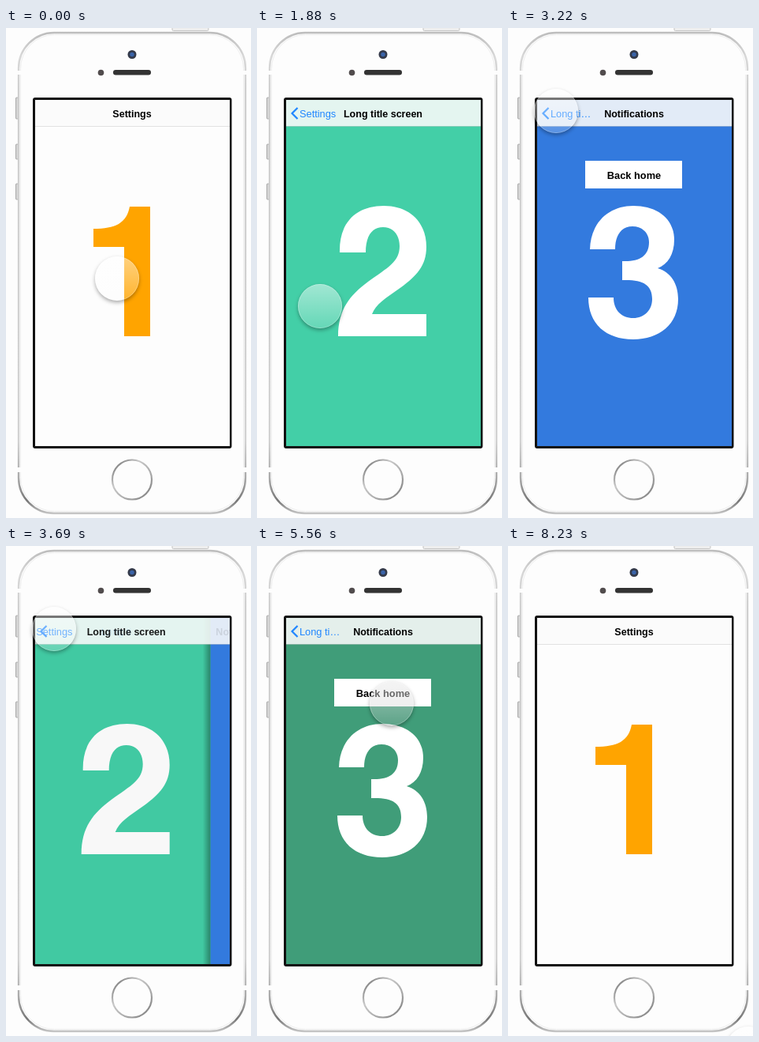
Animation, 311 px wide and 620 px high, one loop 8460 ms. Source, as an HTML page:

```html
<!DOCTYPE html>
<html lang="en">
<head>
<meta charset="utf-8">
<title>Navigation demo</title>
<style>
html, body { margin: 0; width: 100%; height: 100%; overflow: hidden; background: #fdfdfd; }
svg { display: block; width: 311px; height: 620px; }
text { font-family: "Liberation Sans", Arial, sans-serif; }
.title { font-weight: bold; font-size: 12.5px; text-anchor: middle; }
.label { font-size: 12.8px; fill: #1f86ff; }
.button { font-weight: bold; font-size: 12.8px; text-anchor: middle; }
</style>
</head>
<body>
<svg viewBox="0 0 311 620">
  <defs>
    <linearGradient id="metal" x1="0" y1="0" x2="0" y2="1">
      <stop offset="0" stop-color="#bdbdbd"/>
      <stop offset=".05" stop-color="#d8d8d8"/>
      <stop offset=".12" stop-color="#cfcfcf"/>
      <stop offset=".85" stop-color="#d2d2d2"/>
      <stop offset=".93" stop-color="#a8a8a8"/>
      <stop offset=".975" stop-color="#777"/>
      <stop offset="1" stop-color="#c4c4c4"/>
    </linearGradient>
    <linearGradient id="ring" x1="0" y1="0" x2="1" y2="1">
      <stop offset="0" stop-color="#666"/>
      <stop offset=".35" stop-color="#c8c8c8"/>
      <stop offset=".65" stop-color="#aaa"/>
      <stop offset="1" stop-color="#777"/>
    </linearGradient>
    <linearGradient id="glass" x1="0" y1="0" x2="0" y2="1">
      <stop offset="0" stop-color="#fff" stop-opacity=".5"/>
      <stop offset="1" stop-color="#fff" stop-opacity=".18"/>
    </linearGradient>
    <linearGradient id="edge">
      <stop offset="0" stop-opacity="0"/>
      <stop offset="1" stop-opacity=".35"/>
    </linearGradient>
    <filter id="blur" x="-50%" y="-50%" width="200%" height="200%">
      <feGaussianBlur stdDeviation="2.4"/>
    </filter>
    <clipPath id="screen"><rect x="37" y="91" width="247" height="438"/></clipPath>
    <clipPath id="outside">
      <path clip-rule="evenodd" d="M-50-50H50V50H-50ZM28 0A28 28 0 1 0-28 0A28 28 0 1 0 28 0Z"/>
    </clipPath>
  </defs>

  <rect width="311" height="620" fill="#fdfdfd"/>
  <rect x="211" y="-2" width="46" height="5.5" rx="1.5" fill="#eee" stroke="#c4c4c4"/>
  <g fill="#d6d6d6" stroke="#999" stroke-width=".8">
    <rect x="12.5" y="88" width="3" height="27" rx="1"/>
    <rect x="12.5" y="147" width="3" height="19" rx="1"/>
    <rect x="12.5" y="197" width="3" height="20" rx="1"/>
  </g>
  <rect x="16" y="6" width="288" height="608" rx="45" fill="#fdfdfd" stroke="url(#metal)" stroke-width="2.4"/>
  <rect x="18.5" y="8.5" width="283" height="603" rx="43" fill="none" stroke="#eee"/>
  <g fill="#fdfdfd">
    <rect x="13" y="54" width="6" height="5"/>
    <rect x="301" y="54" width="6" height="5"/>
    <rect x="13" y="556" width="6" height="6"/>
    <rect x="301" y="556" width="6" height="6"/>
  </g>
  <circle cx="160" cy="33.5" r="5.5" fill="#343a4a"/>
  <circle cx="160" cy="33.5" r="2.8" fill="#3a63a8"/>
  <circle cx="120.5" cy="56.5" r="3.8" fill="#514c4d"/>
  <rect x="136" y="53" width="48" height="6.5" rx="3.2" fill="#333"/>
  <circle cx="160" cy="571.5" r="25" fill="#fdfdfd" stroke="url(#ring)" stroke-width="2.2"/>

  <rect x="35.5" y="89.5" width="249.5" height="441" rx="1.5" fill="#fdfdfd" stroke="#111" stroke-width="3"/>
  <g clip-path="url(#screen)">
    <g id="pages"></g>
    <rect x="37" y="91" width="247" height="33.5" fill="#fbfbfb" fill-opacity=".88"/>
    <rect x="37" y="124" width="247" height="1" fill-opacity=".1"/>
    <g id="bars"></g>
    <path id="chevron" d="M51.5 101L44.5 108L51.5 115" fill="none" stroke="#1f86ff" stroke-width="2.2"/>
  </g>

  <g id="touch">
    <g clip-path="url(#outside)">
      <circle cy="2.5" r="28" fill-opacity=".32" filter="url(#blur)"/>
    </g>
    <circle id="press" r="28" fill-opacity=".09"/>
    <circle r="28" fill="url(#glass)"/>
    <circle r="27.6" fill="none" stroke="#fff" stroke-opacity=".35" stroke-width=".8"/>
  </g>
</svg>
<script>
const LOOP = 8460, WIDTH = 247, PARALLAX = 74, SWEEP = 160, SLIDE = 400;
const $ = id => document.getElementById(id);

const one = 'M183 226V390H150V277H111V254C139 254 153 247 157 226Z';
const two = 'M105 284C104 246 126 225 161 225C194 225 215 246 215 277C215 301 202 314 183 328' +
  'C163 342 151 349 146 362H215V390H103C103 356 118 338 141 321C166 303 181 296 181 276' +
  'C181 262 173 252 160 252C146 252 138 263 138 284Z';
const three = 'M104 280C105 246 128 225 159 225C189 225 211 241 211 268C211 286 203 299 190 304' +
  'C207 309 216 324 216 343C216 375 192 394 159 394C124 394 102 374 102 341H134' +
  'C134 357 144 367 159 367C173 367 183 357 183 343C183 324 170 318 145 319V295' +
  'C166 296 179 289 179 271C179 259 170 251 158 251C144 251 136 262 136 280Z';
const button = '<rect x="98" y="168" width="123" height="35" fill="#fff"/>' +
  '<text class="button" x="160" y="190.5">Back home</text>';

const pages = [
  { fill: '#fdfdfd', ink: '#ffa400', digit: one, title: 'Settings', back: '' },
  { fill: '#43cfa7', ink: '#fff', digit: two, title: 'Long title screen', back: 'Settings' },
  { fill: '#337ade', ink: '#fff', digit: three, title: 'Notifications', back: 'Long ti…', extra: button },
  { fill: '#409d79', ink: '#fff', digit: three, title: 'Notifications', back: 'Long ti…', extra: button }
];

pages.forEach((p, i) => {
  $('pages').insertAdjacentHTML('beforeend', `<g id="page${i}">
    <rect x="27" y="91" width="10" height="438" fill="url(#edge)"/>
    <rect x="37" y="91" width="${WIDTH}" height="438" fill="${p.fill}"/>
    <path d="${p.digit}" fill="${p.ink}"/>${p.extra || ''}
    <rect id="dim${i}" x="37" y="91" width="${WIDTH}" height="438"/></g>`);
  $('bars').insertAdjacentHTML('beforeend', `<g id="bar${i}">
    <text id="title${i}" class="title" x="160" y="113">${p.title}</text>
    <text id="back${i}" class="label" x="54" y="113">${p.back}</text></g>`);
});

// Spans in which the picture advances: first change, last change, number of steps
const spans = [
  [410, 760, 7], [1360, 1880, 10], [2060, 2750, 13], [2930, 3220, 6], [3460, 3860, 8], [4040, 4390, 7],
  [4800, 5610, 15], [5670, 5850, 4], [6150, 6550, 8], [7390, 7450, 2], [8050, 8230, 3]
];

// Slides: start, lower page, upper page, push or pop
const slides = [
  [355, 0, 1, true], [2005, 1, 2, true], [3405, 1, 2, false], [4745, 1, 3, true], [6095, 0, 3, false]
];

// Touch moves: start, end, control point, end point
const moves = [
  [1310, 1880, 100, 388, 80, 352],
  [2400, 2750, 90, 200, 71, 86],
  [2880, 3220, 66, 95, 61, 105],
  [3990, 4390, 70, 250, 113, 328],
  [5250, 5560, 160, 260, 171, 199],
  [5610, 5850, 167, 195, 164, 191],
  [7340, 7390, 170, 197, 178, 204],
  [7450, 7451, 311, 646, 311, 646],
  [8000, 8230, 308, 640, 305, 636]
];

const clamp = v => Math.max(0, Math.min(1, v));
const smooth = k => k * k * (3 - 2 * k);
const easeInOut = k => k < .5 ? 4 * k ** 3 : 1 - 4 * (1 - k) ** 3;
const bezier = (a, c, b, k) => (1 - k) ** 2 * a + 2 * k * (1 - k) * c + k * k * b;
const shift = (id, x, y = 0) => $(id).setAttribute('transform', `translate(${x} ${y})`);
const fade = (id, v) => $(id).setAttribute('opacity', v);

function stepped(t) {
  let held = 0;
  for (const [a, b, n] of spans) {
    if (t < a) break;
    const step = (b - a) / (n - 1);
    held = Math.min(b, a + step * Math.floor((t - a) / step + .05));
  }
  return held;
}

function drawPages(t) {
  let [start, lower, upper, push] = slides[0];
  for (const s of slides) if (t >= s[0]) [start, lower, upper, push] = s;
  const k = easeInOut(clamp((t - start) / SLIDE));
  const p = push ? k : 1 - k;
  pages.forEach((_, i) => {
    const visible = i === lower && p < 1 || i === upper && p > 0;
    $('page' + i).style.display = $('bar' + i).style.display = visible ? '' : 'none';
    const top = i === upper;
    shift('page' + i, top ? WIDTH * (1 - p) : -PARALLAX * p);
    fade('dim' + i, top ? 0 : .28 * p);
    shift('title' + i, top ? SWEEP * (1 - p) : -PARALLAX * p);
    shift('back' + i, top ? PARALLAX * (1 - p) : -SWEEP * p);
    fade('bar' + i, top ? p : 1 - p);
  });
  fade('chevron', lower === 0 ? p : 1);
}

function drawTouch(t) {
  let x = 141, y = 317;
  for (const [a, b, cx, cy, ex, ey] of moves) {
    const k = smooth(clamp((t - a) / (b - a)));
    x = bezier(x, cx, ex, k);
    y = bezier(y, cy, ey, k);
  }
  shift('touch', x, y);
  fade('touch', t >= 7450 && t < 8050 ? 0 : 1);
  fade('press', t >= 5400 && t < 5850 ? 1 : 0);
}

function draw(time) {
  const t = stepped(time % LOOP);
  drawPages(t);
  drawTouch(t);
}

const begin = performance.now();
function tick() {
  draw(performance.now() - begin);
  requestAnimationFrame(tick);
}
tick();
</script>
</body>
</html>
```
